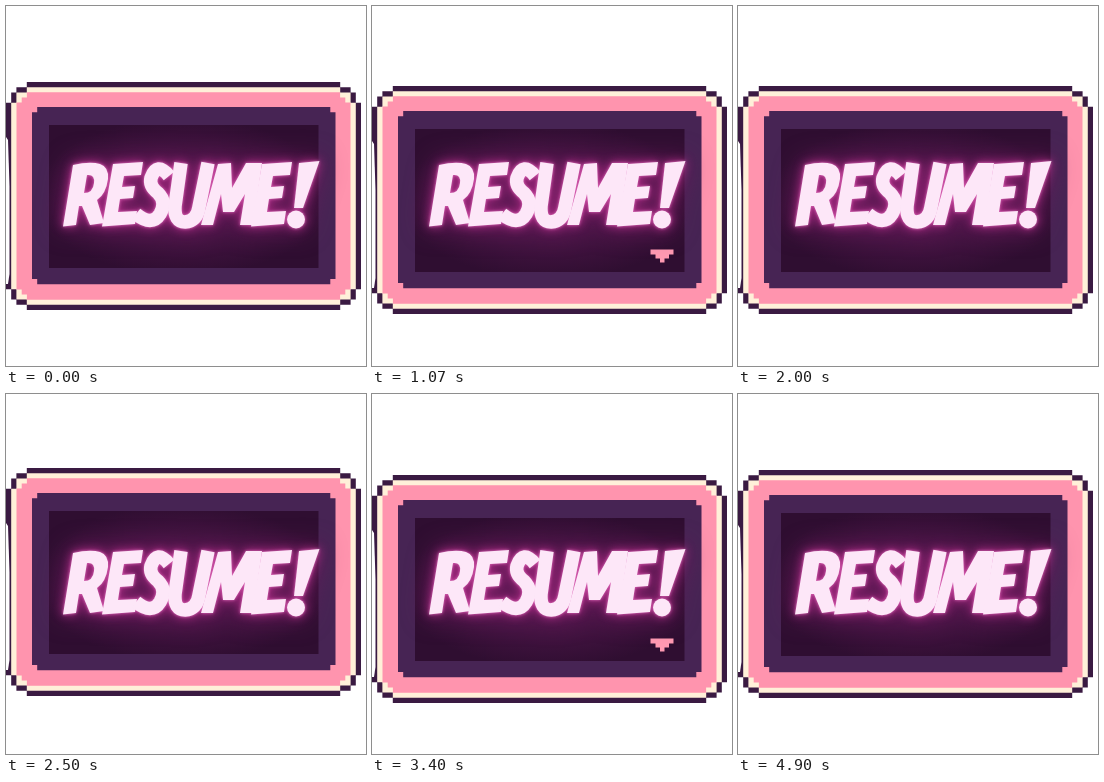
Write an HTML page that moves like this. It is 360 px wide and 360 px high and loops after 5 s.

```html
<!DOCTYPE html>
<html lang="en">
<head>
<meta charset="utf-8">
<title>Resume button</title>
<style>
  html, body { margin: 0; width: 100%; height: 100%; overflow: hidden; background: #fff; }
  svg { display: block; width: 100vw; height: 100vh; }
  .lettering {
    fill: #fde7f8;
    filter: drop-shadow(0 0 1.5px #e070bd) drop-shadow(0 0 5px #b42f8a) drop-shadow(0 0 12px #6c1a5c);
  }
  .lettering .stroke { fill: none; stroke: #fde7f8; stroke-width: 13.5; }
</style>
</head>
<body>
<svg viewBox="0 0 360 360" role="img" aria-label="RESUME!">
  <defs>
    <radialGradient id="glow" cx=".5" cy=".5" r=".55">
      <stop offset="0" stop-color="#551650"/>
      <stop offset=".55" stop-color="#431341"/>
      <stop offset="1" stop-color="#2f0e31"/>
    </radialGradient>
    <path id="letterE" d="M96 220.5L107 158L137 156L135 169L118 170L116 181L129 180L127 192L114 193L112 206L131 205L129 218Z"/>
  </defs>

  <g id="panel">
    <g id="borders"></g>
    <path fill="#fff" d="M0 131L2 134L3.500 180V268L2 278H0Z"/>
    <rect x="43" y="119" width="269.5" height="143" fill="url(#glow)"/>
    <path id="arrow" fill="#ff9ab2" d="M278.500 239.500H301.500V244.500H297V248.500H292.500V252.500H288V248.500H283.500V244.500H278.500Z"/>
  </g>

  <g class="lettering">
    <path fill-rule="evenodd" d="M57 220.500L67 159Q84 155 94 158Q103 161 102 173Q100 188 91 194L98 217L84 219L76 200H73L70 219Z
      M81 169L78 187Q87 187 88 177Q89 168 81 169Z"/>
    <use href="#letterE"/>
    <path class="stroke" d="M163 170Q151 155 145 172Q143 180 152 187Q161 196 154 208Q146 221 130 208"/>
    <path class="stroke" d="M175 157L169 200Q168 216 179 216Q191 215 193 201L202 157"/>
    <path d="M195 219L212 158L225 157L226 182L240 157H256L247 219H234L239 188L228 206H217L215 188L207 219Z"/>
    <use href="#letterE" x="149"/>
    <path d="M293 157L313.500 155L297 202H288Z"/>
    <circle cx="290" cy="213.500" r="9"/>
  </g>
</svg>
<script>
  const LOOP = 5000, BOB = 1200, BLINK = 600, TICK = 100 / 3, CELL = 5.2;
  const panel = document.getElementById('panel');
  const arrow = document.getElementById('arrow');

  // Corner staircases, in cells, from the left side up to the top side.
  const corners = {
    wide: [[0, 4], [1, 4], [1, 2], [2, 2], [2, 1], [4, 1], [4, 0]],
    notch: [[0, 3], [1, 3], [1, 1], [3, 1], [3, 0]],
    stairs: [[0, 2], [1, 2], [1, 1], [2, 1], [2, 0]],
    single: [[0, 1], [1, 1], [1, 0]]
  };

  function steppedBox(x0, y0, x1, y1, corner) {
    const left = corners[corner].map(([x, y]) => [x0 + x * CELL, y0 + y * CELL]);
    const right = left.map(([x, y]) => [x0 + x1 - x, y]).reverse();
    const top = [...left, ...right];
    const bottom = top.map(([x, y]) => [x, y0 + y1 - y]).reverse();
    return 'M' + [...top, ...bottom].join('L') + 'Z';
  }

  const layers = [
    ['#3a1a42', 0, 76, 355, 304, 'wide'],
    ['#fff0d9', 5.2, 81.2, 349.8, 298.8, 'notch'],
    ['#ff94ae', 10.5, 86.2, 344.5, 293.8, 'stairs'],
    ['#472454', 26, 101, 329.5, 278.2, 'single']
  ];
  document.getElementById('borders').innerHTML = layers
    .map(([color, ...box]) => `<path fill="${color}" d="${steppedBox(...box)}"/>`)
    .join('');

  // Poses are held: seven per run, each snapped to a thirtieth of a second.
  const runs = [[100, 570], [670, 1130], [1200, 1700], [1770, 2270], [2330, 2830],
    [2900, 3400], [3470, 3930], [4030, 4500]];
  const snap = time => Math.round(Math.round(time / TICK) * TICK / 10) * 10;
  const poses = [0];
  for (const [from, to] of runs) {
    for (let i = 0; i < 7; i++) poses.push(snap(from + (to - from) * i / 6));
  }
  poses.push(4600, 4670, 4730, 4900);

  function draw(now) {
    const time = now % LOOP;
    const pose = poses.findLast(start => start <= time);
    const swing = pose < 4900 ? Math.sin(2 * Math.PI * pose / BOB) : 0;
    const blink = pose % BLINK;
    panel.setAttribute('transform', `translate(0 ${Math.round(0.4 - 5 * swing)})`);
    arrow.style.visibility = blink >= 200 && blink < 520 ? 'visible' : 'hidden';
  }

  const begin = performance.now();
  function tick() {
    draw(performance.now() - begin);
    requestAnimationFrame(tick);
  }
  tick();
</script>
</body>
</html>
```
